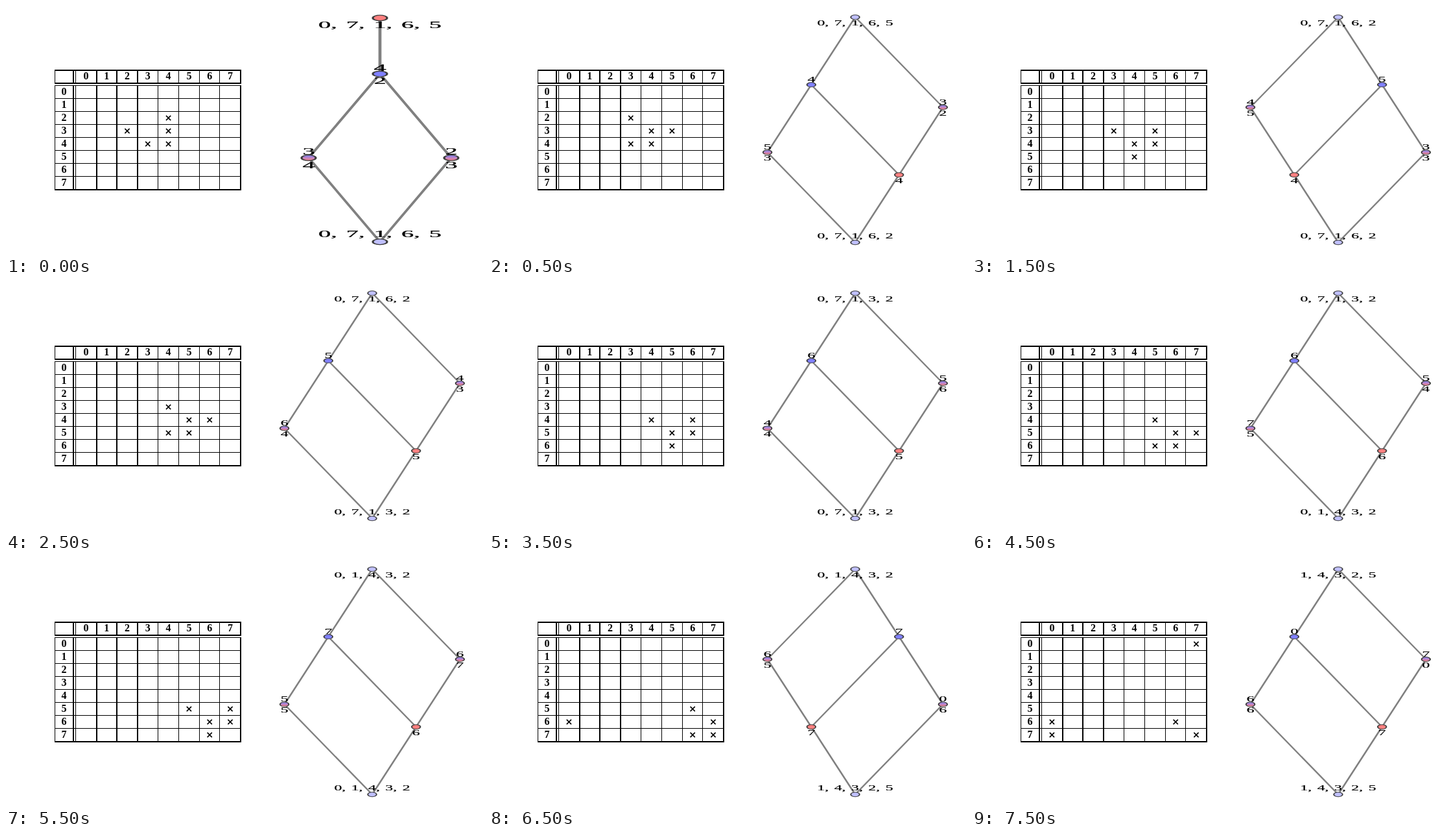
An HTML page for the animation above (8000 ms loop, 736 by 382 pixels).

```html
<!DOCTYPE html>
<html lang="en">
<head>
<meta charset="utf-8">
<title>Glider and its concept lattice</title>
<style>
  html, body { margin: 0; width: 100%; height: 100%; overflow: hidden; background: #fff; }
  svg { display: block; width: 736px; height: 382px; }
  text { font-family: "Liberation Serif", "Times New Roman", serif; text-anchor: middle; }
  .head { font-size: 16px; font-weight: bold; }
  .rule { shape-rendering: crispEdges; }
  .cross { fill: none; stroke: #000; stroke-width: 1.6; }
  .edge { stroke: #808080; stroke-width: 1.2; }
  .node { stroke: #3c3c3c; stroke-width: .8; }
  .label { font-size: 9.8px; word-spacing: 1.08px; stroke: #000; stroke-width: .15; }
</style>
</head>
<body>
<svg viewBox="0 0 736 382">
  <defs>
    <linearGradient id="both" x1="0" y1="0" x2="0" y2="1">
      <stop offset=".1" stop-color="#8c84f4"/>
      <stop offset=".9" stop-color="#f48490"/>
    </linearGradient>
  </defs>
  <g id="table"></g>
  <g id="crosses"></g>
  <g id="lattice"></g>
</svg>
<script>
const STEP = 500, STEPS = 16, SIZE = 8, UNIT = 28;
const DIGITS = [...Array(SIZE).keys()];
const LABEL_ORDER = [0, 7, 1, 6, 4, 3, 2, 5];
const MIRRORED = [3, 13];
const wrap = n => (n + SIZE) % SIZE;
const colX = c => 123.4 + c * 31.8;
const rowY = r => 132 + r * 20;
const el = id => document.getElementById(id);

// Node: [x, y, attribute, object]; "*" stands for all unused lines of the table.
const TALL = {
  cx: 565, base: 364.2, sx: 67.7 / UNIT, sy: 34.7 / UNIT,
  edges: ["01", "02", "13", "14", "24", "35", "45"]
};
const WIDE = { cx: 577, base: 363.2, sx: 110 / UNIT, sy: 43.1 / UNIT };
const SHAPES = [
  { ...WIDE, edges: ["01", "12", "13", "24", "34"],
    nodes: [[0, 8, , "*"], [0, 6, 4, 2], [-1, 3, 3, 4], [1, 3, 2, 3], [0, 0, "*"]] },
  { ...TALL,
    nodes: [[0, 10, , "*"], [-1, 7, 4], [2, 6, 3, 2], [-2, 4, 5, 3], [1, 3, , 4], [0, 0, "*"]] },
  { ...WIDE, edges: ["01", "02", "13", "23", "34"],
    nodes: [[0, 8, , "*"], [-1, 5, 5, 3], [1, 5, 4, 2], [0, 2, 3, 4], [0, 0, "*"]] },
  { ...TALL,
    nodes: [[0, 10, , "*"], [-1, 7, 5], [2, 6, 4, 5], [-2, 4, 3, 3], [1, 3, , 4], [0, 0, "*"]] }
];

// Game of Life on a torus
function evolve(cells) {
  const alive = (r, c) => cells.some(p => p[0] === wrap(r) && p[1] === wrap(c));
  const next = [];
  for (const r of DIGITS) for (const c of DIGITS) {
    let n = 0;
    for (let i = -1; i < 2; i++) for (let j = -1; j < 2; j++)
      if ((i || j) && alive(r + i, c + j)) n++;
    if (n === 3 || (n === 2 && alive(r, c))) next.push([r, c]);
  }
  return next;
}

const states = [[[2, 4], [3, 2], [3, 4], [4, 3], [4, 4]]];
while (states.length < STEPS) states.push(evolve(states[states.length - 1]));

function tableMarkup() {
  const rect = (x, y, w, h) => `<rect class="rule" x="${x}" y="${y}" width="${w}" height="${h}"/>`;
  const text = (x, y, s) => `<text class="head" x="${x}" y="${y}">${s}</text>`;
  let out = "";
  for (const y of [98, 118, 122, 282]) out += rect(75, y, 288, y === 122 ? 1 : 2);
  for (let r = 1; r < SIZE; r++) out += rect(75, 122 + r * 20, 288, 1);
  const xs = [75, 103, 107, ...DIGITS.map(c => Math.round(138.5 + c * 31.8))];
  for (const x of xs) {
    const w = x === 107 || x === 75 ? 1 : x > 220 && x < 350 ? 1 : 2;
    out += rect(x, 98, w, 21) + rect(x, 122, w, 161);
  }
  for (const d of DIGITS) out += text(colX(d), 113, d) + text(89.5, rowY(d) + 4.5, d);
  return out;
}

function crossMarkup(cells) {
  return cells.map(([r, c]) =>
    `<path class="cross" d="M${colX(c) - 3.6} ${rowY(r) - 3.1}l7.2 7.2m0 -7.2l-7.2 7.2"/>`).join("");
}

function latticeMarkup(step) {
  const { cx, base, sx, sy, edges, nodes } = SHAPES[step % 4];
  const shift = Math.floor(step / 4);
  const flip = MIRRORED.includes(step) ? -1 : 1;
  const px = n => n[0] * UNIT * flip, py = n => -n[1] * UNIT;
  const name = (v, axis) => v !== "*" ? wrap(v + shift)
    : LABEL_ORDER.filter(d => !states[step].some(p => p[axis] === d)).join(", ");
  const label = (n, dy, s) => `<text class="label" x="${px(n)}" y="${py(n) + dy}">${s}</text>`;

  let lines = "", dots = "", labels = "";
  for (const [a, b] of edges) {
    const p = nodes[a], q = nodes[b];
    lines += `<line class="edge" x1="${px(p)}" y1="${py(p)}" x2="${px(q)}" y2="${py(q)}"/>`;
  }
  nodes.forEach((n, i) => {
    const meet = edges.filter(e => +e[1] === i).length === 1;
    const join = edges.filter(e => +e[0] === i).length === 1;
    const fill = meet && join ? "url(#both)" : meet ? "#8080ff" : join ? "#ff8080" : "#c0c0ff";
    dots += `<circle class="node" cx="${px(n)}" cy="${py(n)}" r="2.8" fill="${fill}"/>`;
    const [, , attr, obj] = n;
    if (attr !== undefined) labels += label(n, attr === "*" ? -5 : -3.3, name(attr, 1));
    if (obj !== undefined) labels += label(n, 10.2, name(obj, 0));
  });
  return `<g transform="translate(${cx} ${base}) scale(${sx} ${sy})">${lines}${dots}${labels}</g>`;
}

let shown = -1;
function draw(time) {
  const step = Math.floor(Math.max(0, time) / STEP) % STEPS;
  if (step === shown) return;
  shown = step;
  el("crosses").innerHTML = crossMarkup(states[step]);
  el("lattice").innerHTML = latticeMarkup(step);
}

el("table").innerHTML = tableMarkup();
const start = performance.now();
function tick() {
  draw(performance.now() - start);
  requestAnimationFrame(tick);
}
tick();
</script>
</body>
</html>
```
